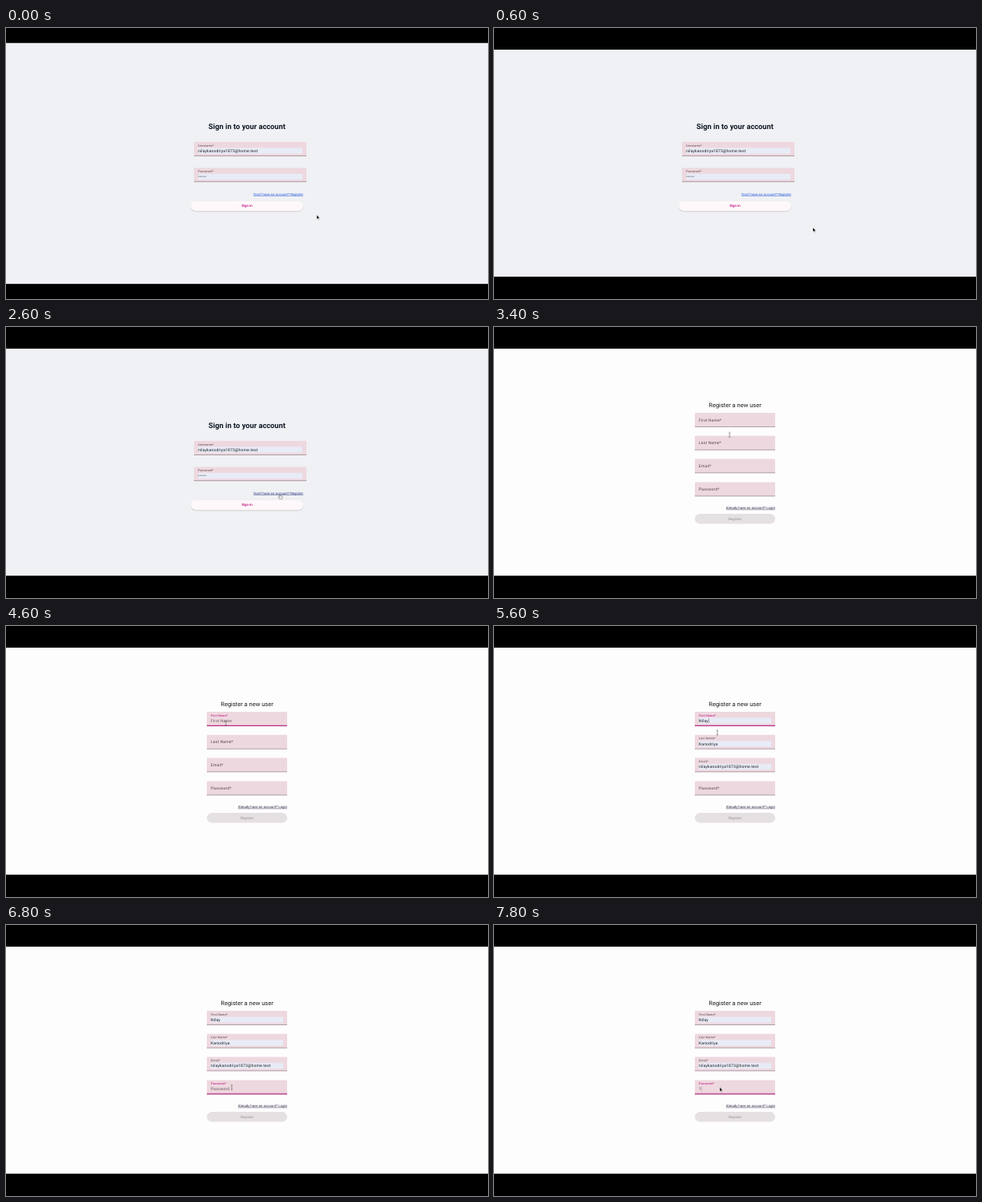
An HTML page for the animation above (8000 ms loop, 600 px wide and 338 px high).

```html
<!DOCTYPE html>
<html lang="en">
<head>
<meta charset="utf-8">
<title>Sign in and register</title>
<style>
  html, body { margin: 0; width: 100%; height: 100%; overflow: hidden; background: #000; }
  svg { display: block; width: 100%; height: 100%; }
  text { font-family: Roboto, Arial, sans-serif; text-rendering: geometricPrecision; fill: #1d1a1c; }

  /* one shared clock: 8 s loop, 2.5% = one 200 ms step */
  .a { animation: 8s step-end infinite; }

  .box { fill: #eed8df; }
  .dim { fill: #dfc9d0; opacity: 0; }
  .fill { fill: #e8ecf7; }
  .rule { fill: #6b585f; }
  .focus { fill: #b90074; opacity: 0; }
  .label, .value { font-size: 5px; letter-spacing: .156px; }
  .label { fill: #54464b; transform: translate(5px, 10.5px); }
  .up { transform: translate(5px, 5.7px) scale(.75); }
  .hint { fill: #66575c; opacity: 0; }
  .small { font-size: 4.375px; }
  .link { text-decoration: underline; text-decoration-thickness: .35px; }
  .mid { text-anchor: middle; }
  .end { text-anchor: end; }
  .caret { fill: #333; opacity: 0; }

  .bar-top { animation-name: barTop; }
  .bar-low { animation-name: barLow; }
  @keyframes barTop { 0% { transform: translateY(-8.3px); } 2.5% { transform: none; } }
  @keyframes barLow { 0% { transform: translateY(8.8px); } 2.5% { transform: none; } }

  .login { animation-name: login; }
  .signup { animation-name: signup; }
  @keyframes login { 0% { opacity: 1; } 37.5% { opacity: 0; } }
  @keyframes signup { 0% { opacity: 0; } 37.5% { opacity: 1; } }

  .to-signup { fill: #2a5bdc; animation-name: toSignup; }
  @keyframes toSignup { 0% { fill: #2a5bdc; } 30% { fill: #26347c; } }

  .hover-login { animation-name: hoverLogin; }
  .hover-first { animation-name: hoverFirst; }
  .hover-pass { animation-name: hoverPass; }
  @keyframes hoverLogin { 0% { opacity: 0; } 27.5% { opacity: 1; } 30% { opacity: 0; } }
  @keyframes hoverFirst { 0% { opacity: 0; } 45% { opacity: 1; } 50% { opacity: 0; } }
  @keyframes hoverPass {
    0% { opacity: 0; } 37.5% { opacity: 1; } 40% { opacity: 0; }
    75% { opacity: 1; } 80% { opacity: 0; }
  }

  .label-first { animation-name: labelFirst; }
  .label-auto { animation-name: labelAuto; }
  .label-pass { animation-name: labelPass; }
  @keyframes labelFirst {
    0% { transform: translate(5px, 10.5px); fill: #54464b; }
    50% { transform: translate(5px, 7.8px) scale(.86); fill: #b90074; }
    52.5% { transform: translate(5px, 5.7px) scale(.75); fill: #b90074; }
    80% { transform: translate(5px, 5.7px) scale(.75); fill: #54464b; }
  }
  @keyframes labelAuto {
    0% { transform: translate(5px, 10.5px); }
    67.5% { transform: translate(5px, 5.7px) scale(.75); }
  }
  @keyframes labelPass {
    0% { transform: translate(5px, 10.5px); fill: #54464b; }
    80% { transform: translate(5px, 7.8px) scale(.86); fill: #b90074; }
    82.5% { transform: translate(5px, 5.7px) scale(.75); fill: #b90074; }
  }

  .focus-first { animation-name: focusFirst; }
  .focus-pass { animation-name: focusPass; }
  @keyframes focusFirst { 0% { opacity: 0; } 50% { opacity: 1; } 80% { opacity: 0; } }
  @keyframes focusPass { 0% { opacity: 0; } 80% { opacity: 1; } }

  .hint-first { animation-name: hintFirst; }
  .hint-pass { animation-name: hintPass; }
  @keyframes hintFirst { 0% { opacity: 0; } 52.5% { opacity: 1; } 67.5% { opacity: 0; } }
  @keyframes hintPass { 0% { opacity: 0; } 82.5% { opacity: 1; } 90% { opacity: 0; } }

  .auto { animation-name: auto; }
  .typed { animation-name: typed; }
  @keyframes auto { 0% { opacity: 0; } 67.5% { opacity: 1; } }
  @keyframes typed { 0% { opacity: 0; } 90% { opacity: 1; } }

  .caret-first { animation-name: caretFirst; }
  .caret-pass { animation-name: caretPass; }
  @keyframes caretFirst { 0% { opacity: 0; } 70% { opacity: 1; } 80% { opacity: 0; } }
  @keyframes caretPass { 0% { opacity: 0; } 97.5% { opacity: .6; } }

  .pointer { animation-name: move; }
  @keyframes move {
    0% { transform: translate(386.8px, 233.2px); }
    7.5% { transform: translate(397px, 249px); }
    10% { transform: translate(378px, 226px); }
    12.5% { transform: translate(295px, 172px); }
    15% { transform: translate(176px, 114px); }
    17.5% { transform: translate(129.8px, 93.2px); }
    20% { transform: translate(130.4px, 93.5px); }
    22.5% { transform: translate(150px, 104px); }
    25% { transform: translate(215px, 140px); }
    27.5% { transform: translate(300px, 181px); }
    30% { transform: translate(338px, 206px); }
    32.5% { transform: translate(340.8px, 208.4px); }
    40% { transform: translate(318px, 158px); }
    42.5% { transform: translate(293.2px, 134.5px); }
    45% { transform: translate(277px, 122.5px); }
    50% { transform: translate(274.5px, 121.6px); }
    52.5% { transform: translate(273.7px, 121.3px); }
    67.5% { transform: translate(276px, 130px); }
    70% { transform: translate(278px, 133px); }
    72.5% { transform: translate(280px, 158px); }
    75% { transform: translate(281px, 197px); }
    77.5% { transform: translate(280.8px, 202.2px); }
    80% { transform: translate(281px, 202.4px); }
  }
  .arrow { animation-name: arrow; }
  .beam { animation-name: beam; }
  .hand { animation-name: hand; }
  @keyframes arrow { 0% { opacity: 1; } 27.5% { opacity: 0; } 97.5% { opacity: 1; } }
  @keyframes beam {
    0% { opacity: 0; } 27.5% { opacity: 1; } 30% { opacity: 0; }
    37.5% { opacity: 1; } 97.5% { opacity: 0; }
  }
  @keyframes hand { 0% { opacity: 0; } 30% { opacity: 1; } 37.5% { opacity: 0; } }
</style>
</head>
<body>
<svg viewBox="0 0 600 338" preserveAspectRatio="none">
  <defs>
    <path id="shape" d="M0 17.5V1.25Q0 0 1.25 0H98.75Q100 0 100 1.25V17.5Z"/>
    <path id="wide" d="M0 17.5V1.25Q0 0 1.25 0H138.75Q140 0 140 1.25V17.5Z"/>
    <filter id="shade" x="-5%" y="-30%" width="110%" height="180%">
      <feDropShadow dx="0" dy=".5" stdDeviation=".55" flood-color="#000" flood-opacity=".38"/>
    </filter>
  </defs>

  <g class="a login">
    <rect width="600" height="338" fill="#eff1f4"/>
    <text class="mid" x="300" y="125.7" font-size="9.3" font-weight="700" style="fill:#111827">Sign in to your account</text>

    <g transform="translate(234 142)">
      <use href="#wide" class="box"/>
      <rect class="fill" x="5" y="7.5" width="130" height="7.2"/>
      <rect class="rule" y="17.1" width="140" height=".5"/>
      <text class="label up">Username*</text>
      <text class="value" x="5" y="12.8">nilaykanodriya1873@home.test</text>
    </g>
    <g transform="translate(234 174.5)">
      <use href="#wide" class="box"/>
      <use href="#wide" class="a dim hover-login"/>
      <rect class="fill" x="5" y="7.5" width="130" height="7.2"/>
      <rect class="rule" y="17.1" width="140" height=".5"/>
      <text class="label up">Password*</text>
      <text class="value" x="5" y="12.9" style="letter-spacing:.5px">•••••</text>
    </g>

    <text class="a small link end to-signup" x="370" y="208.5">Don't have an account? Register</text>
    <rect x="230" y="215.7" width="140" height="12.5" rx="6.25" fill="#fff8fb" filter="url(#shade)"/>
    <text class="small mid" x="300" y="223.4" font-weight="500" style="fill:#b90074">Sign in</text>
  </g>

  <g class="a signup">
    <rect width="600" height="338" fill="#fefdfe"/>
    <text class="mid" x="300" y="99.5" font-size="7.5">Register a new user</text>

    <g transform="translate(250 107)">
      <use href="#shape" class="box"/>
      <use href="#shape" class="a dim hover-first"/>
      <rect class="a fill auto" x="5" y="7.5" width="90" height="7.2"/>
      <rect class="rule" y="17.1" width="100" height=".5"/>
      <rect class="a focus focus-first" y="16.8" width="100" height=".9"/>
      <text class="a label label-first">First Name*</text>
      <text class="a value hint hint-first" x="5" y="12.8">First Name</text>
      <text class="a value auto" x="5" y="12.8">Nilay</text>
      <rect class="a caret caret-first" x="17.2" y="8.2" width=".4" height="5.8"/>
    </g>
    <g transform="translate(250 135.8)">
      <use href="#shape" class="box"/>
      <rect class="a fill auto" x="5" y="7.5" width="90" height="7.2"/>
      <rect class="rule" y="17.1" width="100" height=".5"/>
      <text class="a label label-auto">Last Name*</text>
      <text class="a value auto" x="5" y="12.8">Kanodriya</text>
    </g>
    <g transform="translate(250 164.6)">
      <use href="#shape" class="box"/>
      <rect class="a fill auto" x="5" y="7.5" width="90" height="7.2"/>
      <rect class="rule" y="17.1" width="100" height=".5"/>
      <text class="a label label-auto">Email*</text>
      <text class="a value auto" x="5" y="12.8">nilaykanodriya1873@home.test</text>
    </g>
    <g transform="translate(250 193.4)">
      <use href="#shape" class="box"/>
      <use href="#shape" class="a dim hover-pass"/>
      <rect class="rule" y="17.1" width="100" height=".5"/>
      <rect class="a focus focus-pass" y="16.8" width="100" height=".9"/>
      <text class="a label label-pass">Password*</text>
      <text class="a value hint hint-pass" x="5" y="12.8">Password</text>
      <text class="a value typed" x="5" y="12.8" style="fill:#5c4f54">1</text>
      <rect class="a caret caret-pass" x="8" y="8.4" width=".4" height="5.6"/>
    </g>

    <text class="small link end" x="350" y="226.7" style="fill:#2b2140">Already have an account? Login</text>
    <rect x="250" y="233.1" width="100" height="12.5" rx="6.25" fill="#e5e1e3"/>
    <text class="small mid" x="300" y="240.8" font-weight="500" style="fill:#a59fa2">Register</text>
  </g>

  <rect class="a bar-top" y="-10" width="600" height="37"/>
  <rect class="a bar-low" y="310.2" width="600" height="37"/>

  <g class="a pointer">
    <path class="a arrow" d="M0 0V5L1.2 4 2 5.8 2.8 5.4 2.1 3.7H3.7Z" stroke="#fff" stroke-width=".3"/>
    <path class="a beam" d="M-1.1-3Q0-3 0-2.4Q0-3 1.1-3M0-2.4V2.4M-1.1 3Q0 3 0 2.4Q0 3 1.1 3" fill="none" stroke="#4a4246" stroke-width=".55"/>
    <path class="a hand" d="M-.6 .6Q0-.2 .5 .6V2.2Q1.1 1.8 1.5 2.4Q2.1 2 2.4 2.7Q3.2 2.4 3.2 3.3Q3.2 5 2.4 6H-.2Q-.8 4.9-1.7 3.9Q-1.5 3-.6 3.7Z" fill="#fff" stroke="#222" stroke-width=".45"/>
  </g>
</svg>
</body>
</html>
```
